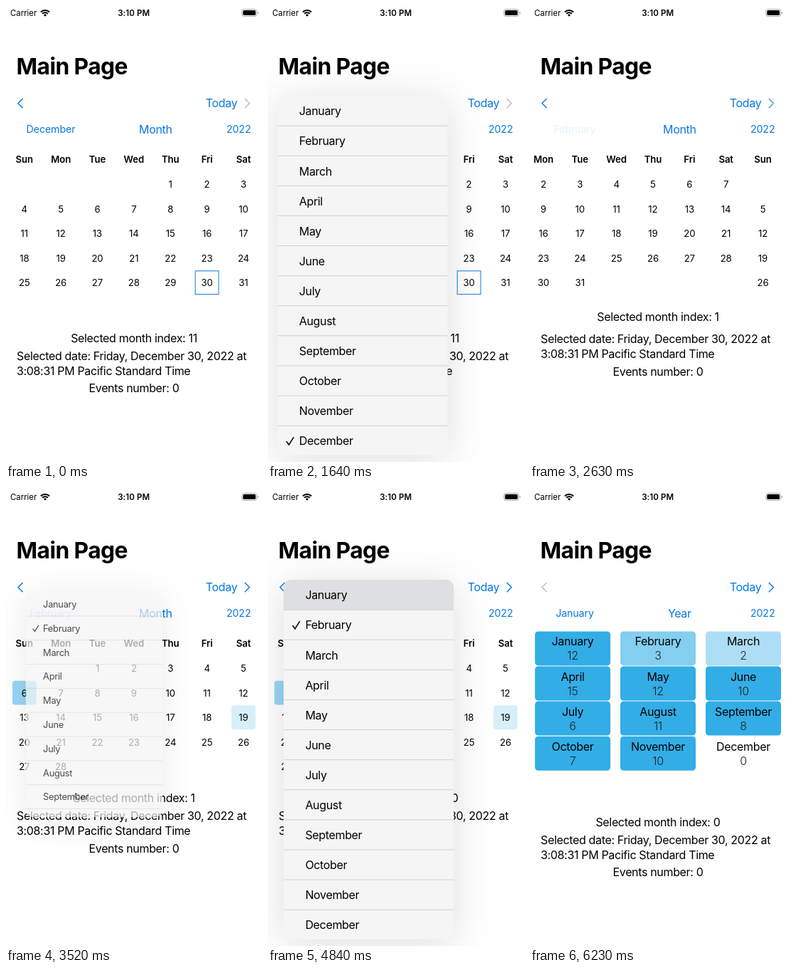
These frames come from a looping animation (360 by 640 pixels, 8000 ms). An HTML page:

```html
<!DOCTYPE html>
<html lang="en">
<head>
<meta charset="utf-8">
<title>Calendar month picker</title>
<style>
  html, body { margin: 0; width: 100%; height: 100%; overflow: hidden; background: #fff; }
  svg { display: block; width: 100vw; height: 100vh; }
  text { font-family: Inter, Roboto, "Liberation Sans", sans-serif; font-optical-sizing: none; white-space: pre; }
  .title { font-size: 31.8px; font-weight: 700; letter-spacing: -.6px; }
  .body { font-size: 16px; letter-spacing: -.34px; }
  .light { font-size: 16px; font-weight: 300; letter-spacing: -.34px; fill: #222; }
  .label { font-size: 14.2px; letter-spacing: -.1px; }
  .day { font-size: 13.2px; letter-spacing: -.1px; }
  .head { font-size: 13.2px; font-weight: 600; letter-spacing: -.1px; }
  .carrier { font-size: 11.4px; }
  .clock { font-size: 11.5px; font-weight: 600; letter-spacing: .1px; }
  .blue { fill: #0678e3; }
  .mid { text-anchor: middle; }
</style>
</head>
<body>
<svg viewBox="0 0 360 640" xmlns="http://www.w3.org/2000/svg">
  <defs>
    <filter id="soft" filterUnits="userSpaceOnUse" x="-150" y="-150" width="560" height="820">
      <feGaussianBlur stdDeviation="28"/>
    </filter>
  </defs>
  <g id="bar">
    <text class="carrier" x="6" y="14">Carrier</text>
    <g fill="none" stroke="#000" stroke-width="2">
      <path d="M48.9 8.5a8.6 8.6 0 0 1 12.2 0"/>
      <path d="M51.1 10.8a5.5 5.5 0 0 1 7.8 0"/>
    </g>
    <path d="M55 14.8l-2.2-2.3a3.1 3.1 0 0 1 4.4 0z"/>
    <text class="clock mid" x="179.7" y="14">3:10 PM</text>
    <rect x="331.8" y="4.6" width="20.8" height="10" rx="3" fill="none" stroke="#a6a6a6"/>
    <rect x="333.3" y="6.1" width="17.8" height="7" rx="1.7"/>
    <path d="M353.8 8v3.4q1.3-.4 1.3-1.7t-1.3-1.7z" fill="#a6a6a6"/>
    <text class="title" x="14.6" y="96.3">Main Page</text>
  </g>
  <g id="view"></g>
</svg>
<script>
const LOOP = 8000;
const MONTHS = ['January', 'February', 'March', 'April', 'May', 'June', 'July',
  'August', 'September', 'October', 'November', 'December'];
const DAYS = ['Sun', 'Mon', 'Tue', 'Wed', 'Thu', 'Fri', 'Sat'];
const COUNTS = [12, 3, 2, 15, 12, 10, 6, 11, 8, 7, 10, 0];
const MARKS = {
  '2022-0': { 1: .72, 13: .2, 14: .54, 20: .72 },
  '2022-1': { 6: .5, 19: .2 },
};
const MENUS = [
  { open: 1300, pick: 2400, x: 13.2, from: 11, to: 1 },
  { open: 3280, pick: 4840, x: 21.8, from: 1, to: 0 },
];
// The screen refreshes only at these moments.
const TICKS = [0, 1300, 1410, 1520, 1640, 1750, 1850, 2400, 2510, 2630, 2730, 2840,
  3280, 3400, 3520, 3640, 3750, 3860, 4840, 4950, 5050, 5150, 5270,
  5660, 5800, 5910, 6020, 6130, 6230];
const CYAN = '#32ade6', BLUE = '#0678e3', GREY = '#bcbcc0';
const view = document.getElementById('view');

const clamp = v => Math.max(0, Math.min(1, v));
const ramp = (t, start, length) => clamp((t - start) / length);
const smooth = u => u * u * (3 - 2 * u);
const text = (s, x, y, cls, opacity = 1) =>
  `<text class="${cls}" x="${x}" y="${y}" opacity="${opacity}">${s}</text>`;
const rect = (x, y, w, h, r, attrs) =>
  `<rect x="${x}" y="${y}" width="${w}" height="${h}" rx="${r}" ${attrs}/>`;
const group = (body, attrs) => `<g ${attrs}>${body}</g>`;
const line = (d, color, width, opacity = 1) =>
  `<path d="${d}" fill="none" stroke="${color}" stroke-width="${width}" opacity="${opacity}"/>`;
const chevron = (d, active) =>
  line(d, GREY, 1.4, 1 - active) + line(d, BLUE, 1.4, active);

function monthPage(year, month, shift) {
  if (Math.abs(shift) >= 360) return '';
  const first = new Date(Date.UTC(year, month, 1)).getUTCDay();
  const total = new Date(Date.UTC(year, month + 1, 0)).getUTCDate();
  // a page loses its marks once it is mostly out of view
  const marks = Math.abs(shift) < 180 && MARKS[year + '-' + month] || {};
  const colX = i => 25.8 + 51.36 * i;
  let out = DAYS.map((d, i) => text(d, colX(i), 220.3, 'head mid')).join('');
  for (let d = 1; d <= total; d++) {
    const n = first + d - 1;
    const x = colX(n % 7), y = 250 + 34.55 * Math.floor(n / 7);
    if (marks[d]) out += rect(x - 16.9, y - 16.9, 33.8, 33.8, 4, `fill="${CYAN}" fill-opacity="${marks[d]}"`);
    if (year === 2022 && month === 11 && d === 30)
      out += rect(x - 16.4, y - 16.4, 32.8, 32.8, 0, 'fill="none" stroke="#2585e4" stroke-width="1.1"');
    out += text(d, x, y + 5, 'day mid');
  }
  return group(out, `transform="translate(${shift} 0)"`);
}

function yearGrid() {
  return MONTHS.map((name, i) => {
    const x = 7 + 120 * (i % 3), y = 198.4 + 49.1 * Math.floor(i / 3);
    return rect(x, y, 106, 48, 4.5, `fill="${CYAN}" fill-opacity="${clamp(COUNTS[i] / 5)}"`) +
      text(name, x + 53, y + 20, 'body mid') + text(COUNTS[i], x + 53, y + 40, 'light mid');
  }).join('');
}

function calendar(t) {
  const slide = pick => smooth(ramp(t, pick + 97, 240));
  if (t < 2840) {
    const pos = 720 * slide(2400);
    return [0, 1, 2].map(i => monthPage(2022, 11 + i, 360 * i - pos)).join('');
  }
  const pos = 360 * slide(4840);
  return monthPage(2022, 1, pos) + monthPage(2022, 0, pos - 360);
}

// 0 = closed, 1 = fully open
const openness = (menu, t) =>
  t < menu.pick ? ramp(t, menu.open, 340) : 1 - ramp(t, menu.pick + 30, 180);

function menuCard(menu, t) {
  const p = openness(menu, t);
  if (!p) return '';
  const scale = .33 + .67 * p, height = 504.6 * (.25 + .75 * p), row = 42.1;
  let rows = rect(0, 0, 239.6, height, 11, 'fill="#f5f5f6"');
  if (t >= menu.pick)
    rows += rect(0, row * menu.to, 239.6, row, 0, 'fill="#dedfe0"');
  MONTHS.forEach((name, i) => {
    const y = row * i;
    if (i) rows += line(`M0 ${y}H239.6`, '#cdcdcf', .9);
    rows += text(name, 30.6, y + 27.3, 'body');
    if (i === menu.from) rows += line(`M12.6 ${y + 22}l3.6 4.6 6.8-10.6`, '#111', 1.7);
  });
  const left = menu.x + 29 * (1 - scale), top = 126 + 87 * (1 - scale);
  return group(
    `<clipPath id="card">${rect(0, 0, 239.6, height, 11, '')}</clipPath>` +
    rect(0, 6, 239.6, height, 11, 'fill-opacity=".13" filter="url(#soft)"') +
    group(rows, 'clip-path="url(#card)"'),
    `transform="translate(${left} ${top}) scale(${scale})" opacity="${p}"`);
}

function draw(t) {
  const [first, second] = MENUS;
  const index = t < first.pick ? 11 : t < second.pick ? 1 : 0;
  const current = t < first.open ? null : t < second.open ? first : second;

  // month label fades out under the menu and back in after a choice
  let fade = 1;
  if (current) fade = t < current.pick ? 1 - openness(current, t) : ramp(t, current.pick + 217, 133);

  const year = t >= 5800 ? smooth(ramp(t, 5690, 420)) : 0;
  const monthOpacity = t >= 5660 ? .35 * (1 - year) : 1;

  // the texts move up for a five-row month and down again for six rows
  const rise = smooth(ramp(t, first.pick + 20, 330));
  const fall = smooth(ramp(t, second.pick + 20, 330));
  const lift = 33.8 * (rise - fall);
  const lead = t < second.pick
    ? 33.8 * (1 - (1 - rise) ** 1.8)
    : 33.8 * (1 - fall) ** 1.8;

  return chevron('M23.6 130l-6.6 6.6 6.6 6.6', 1 - fall) +
    chevron('M335.8 130l6.6 6.6-6.6 6.6', rise) +
    text('Today', 280.8, 142.2, 'body blue') +
    text(MONTHS[index], 63, 178.2, 'label blue mid', fade) +
    text('Month', 210.3, 178.5, 'body blue mid', monthOpacity) +
    text('Year', 210.3, 178.5, 'body blue mid', year) +
    text('2022', 327.2, 178.2, 'label blue mid') +
    (year < 1 ? group(calendar(t), `opacity="${1 - year}"`) : '') +
    (year > 0 ? group(yearGrid(), `opacity="${year}"`) : '') +
    text('Selected month index: ' + index, 180, 472.2 - lead, 'body mid') +
    group(
      text('Selected date: Friday, December 30, 2022 at', 15, 496.8, 'body') +
      text('3:08:31 PM Pacific Standard Time', 15, 517.8, 'body') +
      text('Events number: 0', 180, 542.4, 'body mid'),
      `transform="translate(0 ${-lift})"`) +
    MENUS.map(m => menuCard(m, t)).join('');
}

let shown = -1;
function frame(now) {
  const t = now % LOOP;
  const tick = TICKS.filter(s => s <= t).pop();
  if (tick !== shown) view.innerHTML = draw(shown = tick);
  requestAnimationFrame(frame);
}
frame(0);
</script>
</body>
</html>
```
